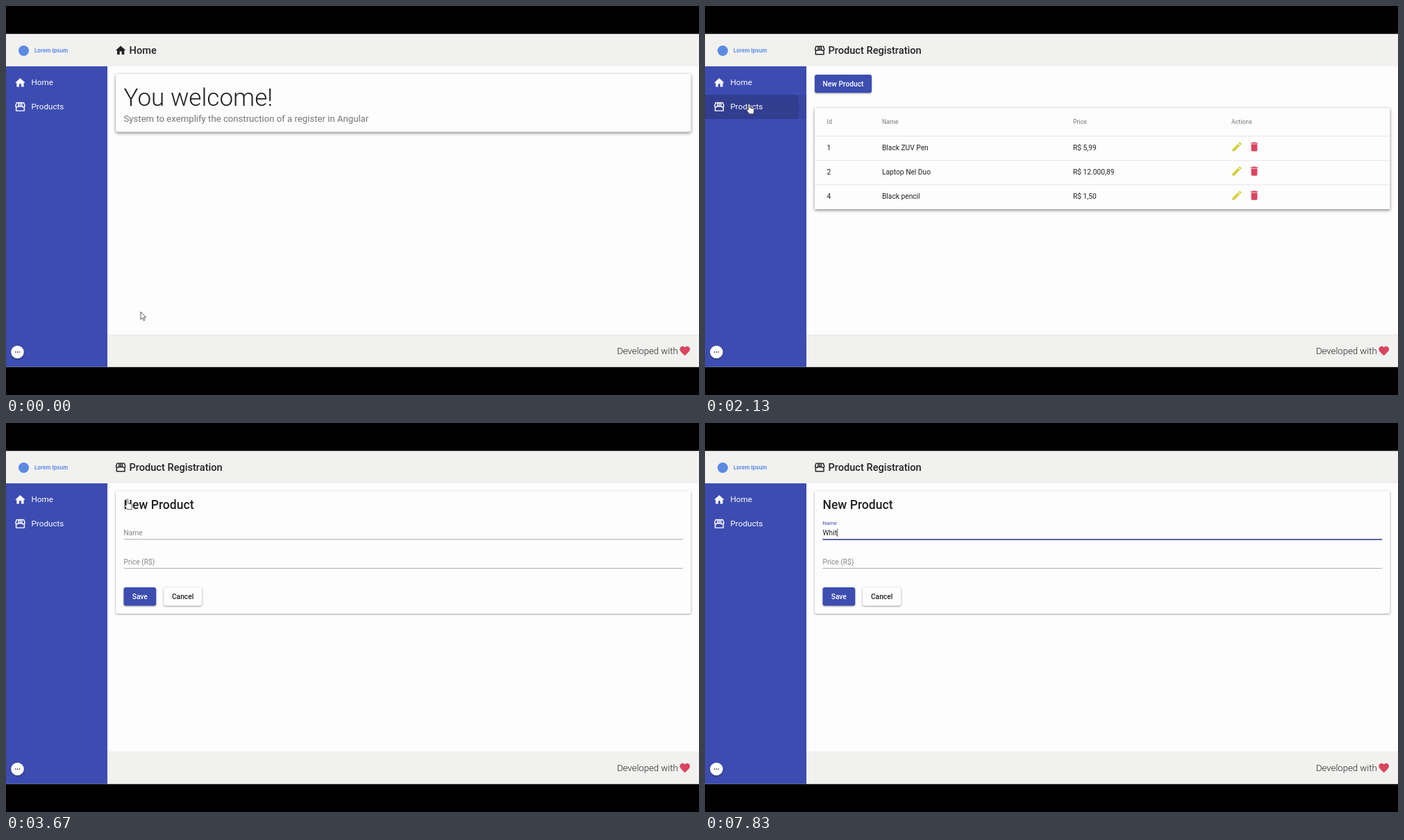
Write an HTML page that moves like this. It is 998 by 561 pixels and loops after 8 s.

```html
<!DOCTYPE html>
<html lang="en">
<head>
<meta charset="utf-8">
<title>Product registration</title>
<style>
  html, body { margin: 0; width: 100%; height: 100%; overflow: hidden; background: #000; }
  svg { display: block; width: 100%; height: 100%; }
  text { font-family: Roboto, sans-serif; fill: #222; }
  .nav { font-size: 11.7px; fill: #fff; }
  .title { font-size: 14.6px; font-weight: 500; }
  .sub { font-size: 13.16px; }
  .cell, .btn, .field { font-size: 10.23px; }
  .th { font-size: 8.77px; fill: #757575; }
  .btn { font-weight: 500; text-anchor: middle; }
  .white { fill: #fff; }
  .field { fill: #858585; }
  .card { fill: #fdfdfd; filter: drop-shadow(0 1px 1px rgba(0,0,0,.32)) drop-shadow(0 0 1px rgba(0,0,0,.14)); }
  .high { filter: drop-shadow(0 2px 2px rgba(0,0,0,.36)) drop-shadow(0 0 1.5px rgba(0,0,0,.16)); }
  .primary { fill: #3d4db0; filter: drop-shadow(0 1px 1px rgba(0,0,0,.35)); }
  .pointer { fill: #fff; stroke: #222; stroke-width: .75; stroke-linejoin: round; }
</style>
</head>
<body>
<svg viewBox="0 0 998 561">
  <defs>
    <path id="home" d="M10 20v-6h4v6h5v-8h3L12 3 2 12h3v8z"/>
    <path id="store" fill="none" stroke-width="2" stroke-linejoin="round"
      d="M4 12v8h16v-8M3 9.5L5 4h14l2 5.5M8.6 10L9 4M12 10V4M15.4 10L15 4M3 9.5a2.4 2.4 0 0 0 5.5.5 1.8 1.8 0 0 0 3.5 0 1.8 1.8 0 0 0 3.5 0 2.4 2.4 0 0 0 5.5-.5"/>
    <path id="edit" fill="#d3cf35" d="M3 17.25V21h3.75L17.81 9.94l-3.75-3.75zM20.71 7.04a1 1 0 0 0 0-1.41l-2.34-2.34a1 1 0 0 0-1.41 0l-1.83 1.83 3.75 3.75z"/>
    <path id="bin" fill="#d9455f" d="M6 19c0 1.1.9 2 2 2h8c1.1 0 2-.9 2-2V7H6zM19 4h-3.5l-1-1h-5l-1 1H5v2h14z"/>
    <path id="heart" fill="#d9455f" d="M12 21.35l-1.45-1.32C5.4 15.36 2 12.28 2 8.5 2 5.42 4.42 3 7.5 3c1.74 0 3.41.81 4.5 2.09C13.09 3.81 14.76 3 16.5 3 19.58 3 22 5.42 22 8.5c0 3.78-3.4 6.86-8.55 11.54z"/>
    <clipPath id="navClip"><rect y="128" width="146" height="35"/></clipPath>
    <clipPath id="btnClip"><rect x="158" y="99" width="82" height="26.3" rx="3"/></clipPath>
  </defs>

  <rect y="40.5" width="998" height="480" fill="#fdfdfd"/>
  <rect y="40.5" width="998" height="46.5" fill="#f1f1f0"/>
  <rect x="146" y="474" width="852" height="46.5" fill="#f1f1f0"/>
  <path d="M146 474.3h852" stroke="#e6e6ea" stroke-width=".7"/>
  <rect y="87" width="146" height="433.5" fill="#3d4cb1"/>
  <circle cx="25.5" cy="64.5" r="7.5" fill="#5b8ae0"/>
  <text x="41" y="67.2" style="font:600 7.7px Inter,sans-serif;fill:#4a7fe0">Lorem Ipsum</text>

  <rect id="hover" y="128" width="146" height="35"/>
  <circle id="navRipple" cx="62.5" cy="146.5" clip-path="url(#navClip)"/>
  <g fill="#fff" stroke="none">
    <use href="#home" transform="translate(11.7 101.9) scale(.731)"/>
    <use href="#store" stroke="#fff" transform="translate(11.7 136.5) scale(.731)"/>
  </g>
  <text class="nav" x="36.5" y="114.3">Home</text>
  <text class="nav" x="36.5" y="149.3">Products</text>
  <circle class="card" cx="16.5" cy="499" r="9.3" style="fill:#fff"/>
  <g fill="#222"><circle cx="13.6" cy="499" r=".85"/><circle cx="16.5" cy="499" r=".85"/><circle cx="19.4" cy="499" r=".85"/></g>
  <text class="sub" x="880" y="501.5" font-weight="300">Developed with</text>
  <use href="#heart" transform="translate(968.9 488.6) scale(.731)"/>

  <g id="homePage">
    <use href="#home" fill="#222" transform="translate(156.4 55.3) scale(.731)"/>
    <text class="title" x="177.5" y="69.2">Home</text>
    <rect class="card high" x="158" y="98" width="828.5" height="83.5" rx="3"/>
    <text x="169.5" y="143.6" font-size="35.1" font-weight="300">You welcome!</text>
    <text class="sub" x="169.5" y="166.8" style="fill:#757575">System to exemplify the construction of a register in Angular</text>
  </g>

  <g id="productTitle">
    <use href="#store" stroke="#222" transform="translate(156.4 55.2) scale(.731)"/>
    <text class="title" x="177.5" y="69.2">Product Registration</text>
  </g>

  <g id="listPage">
    <rect class="primary" x="158" y="99" width="82" height="26.3" rx="3"/>
    <circle id="btnRipple" cx="174" cy="112" fill="#fff" clip-path="url(#btnClip)"/>
    <text class="btn white" x="199" y="115.6">New Product</text>
    <rect class="card high" x="158" y="147" width="828.5" height="146"/>
    <path d="M158 187.7h828.5M158 222.7h828.5M158 257.8h828.5" stroke="#dedee8" stroke-width=".8"/>
    <g id="rows"></g>
  </g>

  <g id="formPage">
    <rect class="card" x="158" y="98" width="828.5" height="177" rx="3"/>
    <text x="169.5" y="124" font-size="17.55" font-weight="500">New Product</text>
    <path d="M169.5 167.8h805.5M169.5 209.6h805.5" stroke="#949494" stroke-width=".8"/>
    <rect id="focusLine" y="167.3" height="1.5" fill="#35408f"/>
    <text id="label" class="field">Name</text>
    <text id="typed" class="cell" x="169.5" y="162"></text>
    <rect id="caret" y="152.5" width=".8" height="11.5" fill="#333"/>
    <text class="field" x="169.5" y="203.6">Price (R$)</text>
    <rect class="primary" x="169.5" y="237" width="46.7" height="26.5" rx="3"/>
    <text class="btn white" x="192.8" y="253.6">Save</text>
    <rect class="card" x="227" y="237" width="55.3" height="26.5" rx="3"/>
    <text class="btn" x="254.6" y="253.6">Cancel</text>
  </g>

  <path id="arrow" class="pointer" d="M0 0v11l2.5-2.3 1.8 4 1.7-.8-1.8-3.8h3.4z"/>
  <path id="hand" class="pointer" d="M-1.2 1.2a1.2 1.2 0 0 1 2.4 0v4.6l4.6 1.1q1.7.5 1.5 2.2l-.9 5.6h-6.2l-4-5.6q.5-1.4 2-.6l.6.7z"/>
</svg>

<script>
const LOOP = 8000;
const $ = id => document.getElementById(id);
const show = (id, on) => $(id).style.display = on ? '' : 'none';
const set = (id, attrs) => { for (const k in attrs) $(id).setAttribute(k, attrs[k]); };
const mix = (a, b, p) => a + (b - a) * p;
const part = (t, from, to) => Math.min(1, Math.max(0, (t - from) / (to - from)));
const smooth = p => p * p * (3 - 2 * p);

function bezier(x1, y1, x2, y2) {
  const at = (a, b, s) => 3 * a * s * (1 - s) ** 2 + 3 * b * s * s * (1 - s) + s ** 3;
  return x => {
    let lo = 0, hi = 1;
    for (let i = 0; i < 20; i++) {
      const mid = (lo + hi) / 2;
      if (at(x1, x2, mid) < x) lo = mid; else hi = mid;
    }
    return at(y1, y2, hi);
  };
}
const swift = bezier(.25, .8, .25, 1);
const decelerate = bezier(0, 0, .2, 1);

const columns = [175.5, 255, 530, 758];
const products = [
  ['1', 'Black ZUV Pen', 'R$ 5,99'],
  ['2', 'Laptop Nel Duo', 'R$ 12.000,89'],
  ['4', 'Black pencil', 'R$ 1,50'],
];
const line = (cells, y, cls) =>
  cells.map((c, i) => `<text class="${cls}" x="${columns[i]}" y="${y}">${c}</text>`).join('');
const icon = (id, x, y) =>
  `<use href="#${id}" transform="translate(${x - 8.77} ${y - 8.77}) scale(.731)"/>`;
$('rows').innerHTML = line(['Id', 'Name', 'Price', 'Actions'], 170, 'th') +
  products.map((p, i) => {
    const y = 203 + i * 35.1;
    return line(p, y + 4.8, 'cell') + icon('edit', 766, y) + icon('bin', 791, y);
  }).join('');

// Pointer stops: time, x, y
const stops = [
  [0, 194, 441], [670, 194, 441], [770, 92, 193], [930, 92, 193], [1500, 63.5, 141],
  [2600, 63.5, 141], [3170, 174.5, 110], [4500, 174.5, 110], [4770, 230, 154], [LOOP, 230, 154],
];
// Typed text: time, value
const typing = [[0, ''], [6430, 'W'], [7270, 'Wh'], [7500, 'Whi'], [7730, 'Whit']];
const caretOn = [[5130, 5670], [6200, 7000], [7270, LOOP]];

function pointer(t) {
  const i = stops.findIndex(s => t < s[0]);
  const [t0, x0, y0] = stops[i - 1], [t1, x1, y1] = stops[i];
  const p = smooth(part(t, t0, t1));
  return [mix(x0, x1, p), mix(y0, y1, p)];
}

function ripple(id, t, start, radius, fadeFrom, fadeTo) {
  set(id, {
    r: radius * decelerate(part(t, start, start + 450)),
    opacity: .13 * part(t, start, start + 60) * (1 - part(t, fadeFrom, fadeTo)),
  });
}

function draw(t) {
  const onList = t >= 2100 && t < 3570, onForm = t >= 3570;
  show('homePage', t < 2100);
  show('productTitle', t >= 2100);
  show('listPage', onList);
  show('formPage', onForm);

  const [x, y] = pointer(t);
  const overNav = x < 146 && y > 128 && y < 163;
  const overButton = onList && x > 158 && y < 125;
  const hand = overNav || overButton || (onForm && t < 3830);
  for (const id of ['arrow', 'hand']) set(id, { transform: `translate(${x} ${y})` });
  show('hand', hand);
  show('arrow', !hand && t < 4770);
  set('hover', { opacity: overNav ? mix(.03, .13, part(t, 2000, 2300)) : 0 });
  ripple('navRipple', t, 1900, 86, 2150, 2570);
  ripple('btnRipple', t, 3430, 68, 3600, 3830);

  const float = swift(part(t, 5116, 5516));
  const color = [133, 133, 133].map((c, i) => mix(c, [63, 77, 181][i], float));
  $('label').style.fill = `rgb(${color})`;
  set('label', { transform: `translate(169.5 ${mix(162, 146.6, float)}) scale(${mix(1, .75, float)})` });

  const width = 805.5 * mix(.5, 1, swift(part(t, 5116, 5416)));
  set('focusLine', { x: 572.25 - width / 2, width });
  show('focusLine', t >= 5116);

  $('typed').textContent = typing.filter(s => t >= s[0]).pop()[1];
  show('caret', caretOn.some(([a, b]) => t >= a && t < b));
  if (onForm) set('caret', { x: 169.5 + $('typed').getComputedTextLength() });
}

const begin = performance.now();
function tick() {
  draw((performance.now() - begin) % LOOP);
  requestAnimationFrame(tick);
}
tick();
</script>
</body>
</html>
```
